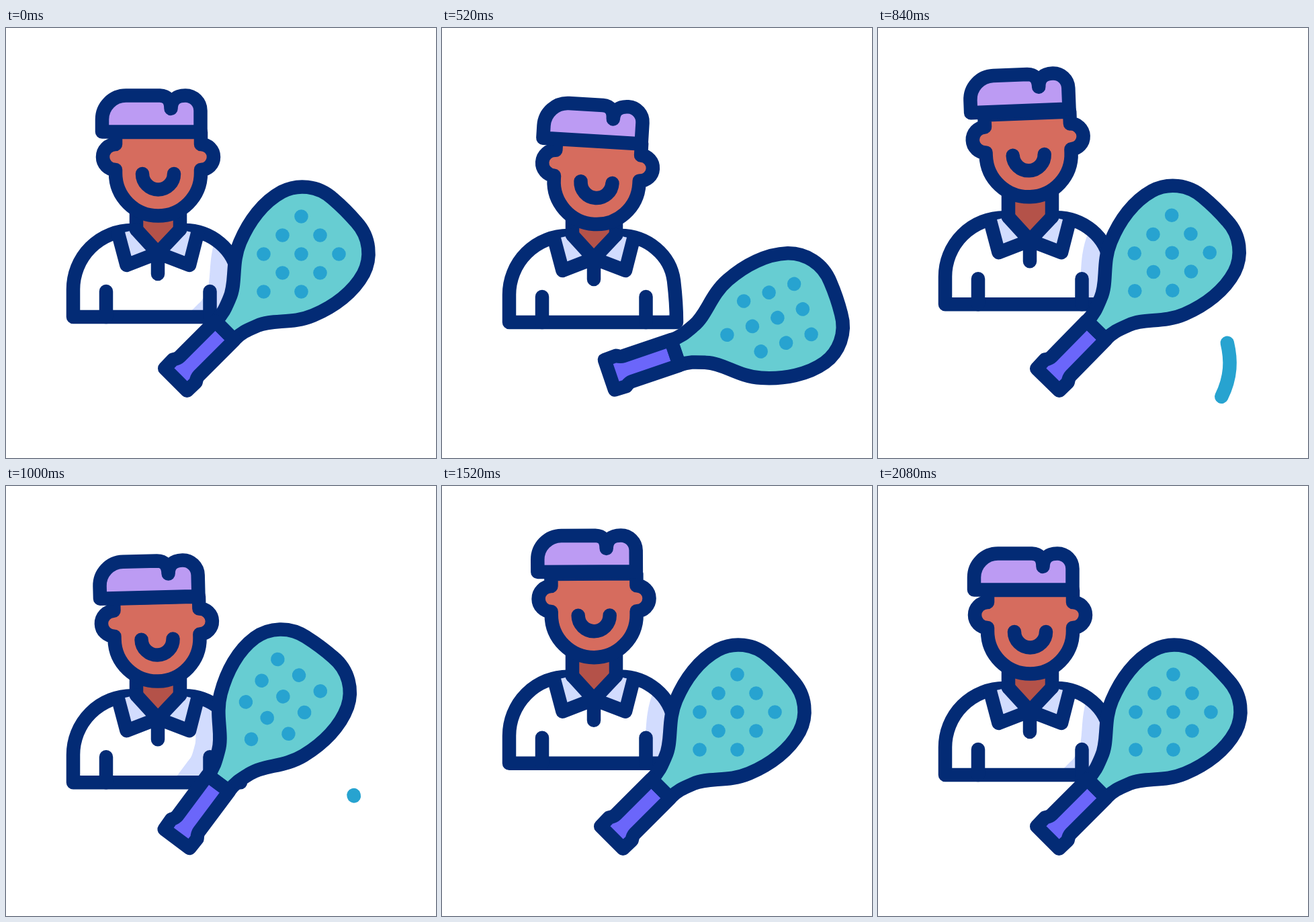
An HTML page with a canvas that plays this animation: 640x640 px, repeating every 2480 ms.

```html
<!DOCTYPE html>
<html lang="en">
<head>
<meta charset="utf-8">
<title>Padel player</title>
<style>
  html, body { margin: 0; width: 100%; height: 100%; overflow: hidden; background: #fff; }
  canvas { display: block; width: 100vmin; height: 100vmin; }
</style>
</head>
<body>
<canvas id="stage" width="640" height="640"></canvas>
<script>
const ctx = document.getElementById('stage').getContext('2d');
const LOOP = 2480, STEP = 40, RAD = Math.PI / 180;
const NAVY = '#032b75', WHITE = '#fff', SHADE = '#d2dcfe', SKIN = '#d66c5e', NECK = '#b45249',
      HAIR = '#bc9bf3', TEAL = '#67cdd2', BLUE = '#27a3d0', GRIP = '#6b66fa';

const P = d => new Path2D(d);

const shirt = P('M100 430V389A88 88 0 0 1 188 301H265C306 301 340 330 345 368C347 385 349 402 349 430Z');
const neck = P('M194 235V300L226 335L259 300V235Z');
const neckSides = P('M194 235V300M259 235V300');
const flaps = P('M167 306L179.5 353L226 335L273 353L285 306L259 300L226 335L194 300Z');
const collar = P('M167 306L179.5 353L226 335L273 353L285 306M194 300L226 335L259 300M226 335V366');
const arms = P('M149 430V392M303.5 430V392');

const face = P('M163 155V173A19 19 0 0 0 163 211V216A63.5 63.5 0 0 0 290 216V211A19 19 0 0 0 290 173V155Z');
const smile = P('M203 217A23.5 23.5 0 0 0 250 217');
const hair = P('M143 154.5V136A35.5 35.5 0 0 1 178.5 100.5H229Q245.5 101 245.5 120' +
  'Q246 100.5 267 100.5A22.5 22.5 0 0 1 289.5 123V154.5Z');

// Racket stands upright around the middle of its holes
const blade = P('M-25 -91.5Q0 -93.5 25 -91.5C55 -90 78 -70 86 -45C95 -15 90 20 77 52' +
  'C64 84 38 98 29 122C23 137 19.5 145 19.5 161H-19.5C-19.5 145 -23 137 -29 122' +
  'C-38 98 -64 84 -77 52C-90 20 -95 -15 -86 -45C-78 -70 -55 -90 -25 -91.5Z');
const handle = P('M-20 161V236Q-20 240 -24 246L-23.5 264H23.5L24 246Q20 240 20 236V161Z');

const swoosh = P('M507.5 556C528 519 526 490 517.5 460');
const SWOOSH_LEN = 100;

// Pairs of time and value
const bodyY = [0, 0, 370, 38.5, 700, -32.5, 1110, 20, 1500, -17.5, 1880, 6, 2080, 0];
const headY = [0, 0, 380, 11, 760, -11, 1150, 5, 1520, -7, 1900, 3, 2080, 0];
const headTurn = [0, 0, 200, 0, 640, 4.2, 900, -3.2, 1120, 0.9, 1320, -0.3, 1520, -0.3, 1720, 0];
const racketTurn = [0, 0, 520, 26.2, 600, 26.2, 960, -9.5, 1160, 3.4, 1360, -1, 1520, 0];
const trailTip = [0, 0, 640, 0, 890, 1];
const trailEnd = [0, 0, 800, 0, 1020, 1];

function at(keys, t) {
  for (let i = 2; i < keys.length; i += 2) {
    if (t < keys[i]) {
      const [t0, a, t1, b] = keys.slice(i - 2, i + 2);
      return a + (b - a) * (1 - Math.cos(Math.PI * (t - t0) / (t1 - t0))) / 2;
    }
  }
  return keys[keys.length - 1];
}

function fill(path, color) {
  ctx.fillStyle = color;
  ctx.fill(path);
}

function line(path, color = NAVY, width = 20.5) {
  ctx.strokeStyle = color;
  ctx.lineWidth = width;
  ctx.stroke(path);
}

function shape(path, color) {
  fill(path, color);
  line(path);
}

function group(draw) {
  ctx.save();
  draw();
  ctx.restore();
}

function placeRacket(angle) {
  ctx.translate(266, 512.5);
  ctx.rotate(angle * RAD);
  ctx.translate(173.5, -176);
  ctx.rotate(45 * RAD);
}

function drawBody(y, angle) {
  group(() => {
    ctx.translate(0, y);
    fill(shirt, WHITE);
    group(() => {
      ctx.clip(shirt);
      ctx.translate(0, -y);
      placeRacket(angle);
      line(blade, SHADE, 72);
      line(handle, SHADE, 72);
    });
    line(shirt);
    fill(neck, NECK);
    fill(flaps, SHADE);
    line(neckSides);
    line(collar);
    line(arms);
  });
}

function drawHead(y, lift, angle) {
  group(() => {
    ctx.translate(226.5, 275 + y);
    ctx.rotate(angle * RAD);
    ctx.translate(-226.5, -275);
    shape(face, SKIN);
    line(smile);
    ctx.translate(0, lift);
    shape(hair, HAIR);
  });
}

function drawTrail(t) {
  const end = at(trailEnd, t) * SWOOSH_LEN, tip = at(trailTip, t) * SWOOSH_LEN;
  if (tip - end < 0.5) return;
  group(() => {
    ctx.setLineDash([tip - end, 400]);
    ctx.lineDashOffset = -end;
    line(swoosh, BLUE);
  });
}

function drawRacket(angle) {
  group(() => {
    placeRacket(angle);
    fill(blade, TEAL);
    fill(handle, GRIP);
    line(blade);
    line(handle);
    ctx.fillStyle = BLUE;
    for (let i = 0; i < 10; i++) {
      const x = i < 9 ? i % 3 - 1 : 0, y = i < 9 ? Math.floor(i / 3) - 1 : 2;
      ctx.beginPath();
      ctx.arc(x * 39.6, y * 39.6, 10.3, 0, 2 * Math.PI);
      ctx.fill();
    }
  });
}

function render(t) {
  ctx.fillStyle = WHITE;
  ctx.fillRect(0, 0, 640, 640);
  ctx.lineCap = ctx.lineJoin = 'round';
  const y = at(bodyY, t), nod = at(headY, t), swing = at(racketTurn, t);
  drawBody(y, swing);
  drawHead(y + nod, nod * 0.36, at(headTurn, t));
  drawTrail(t);
  drawRacket(swing);
}

const start = performance.now();
function tick() {
  const t = (performance.now() - start) % LOOP;
  render(Math.floor(t / STEP) * STEP);
  requestAnimationFrame(tick);
}
tick();
</script>
</body>
</html>
```
